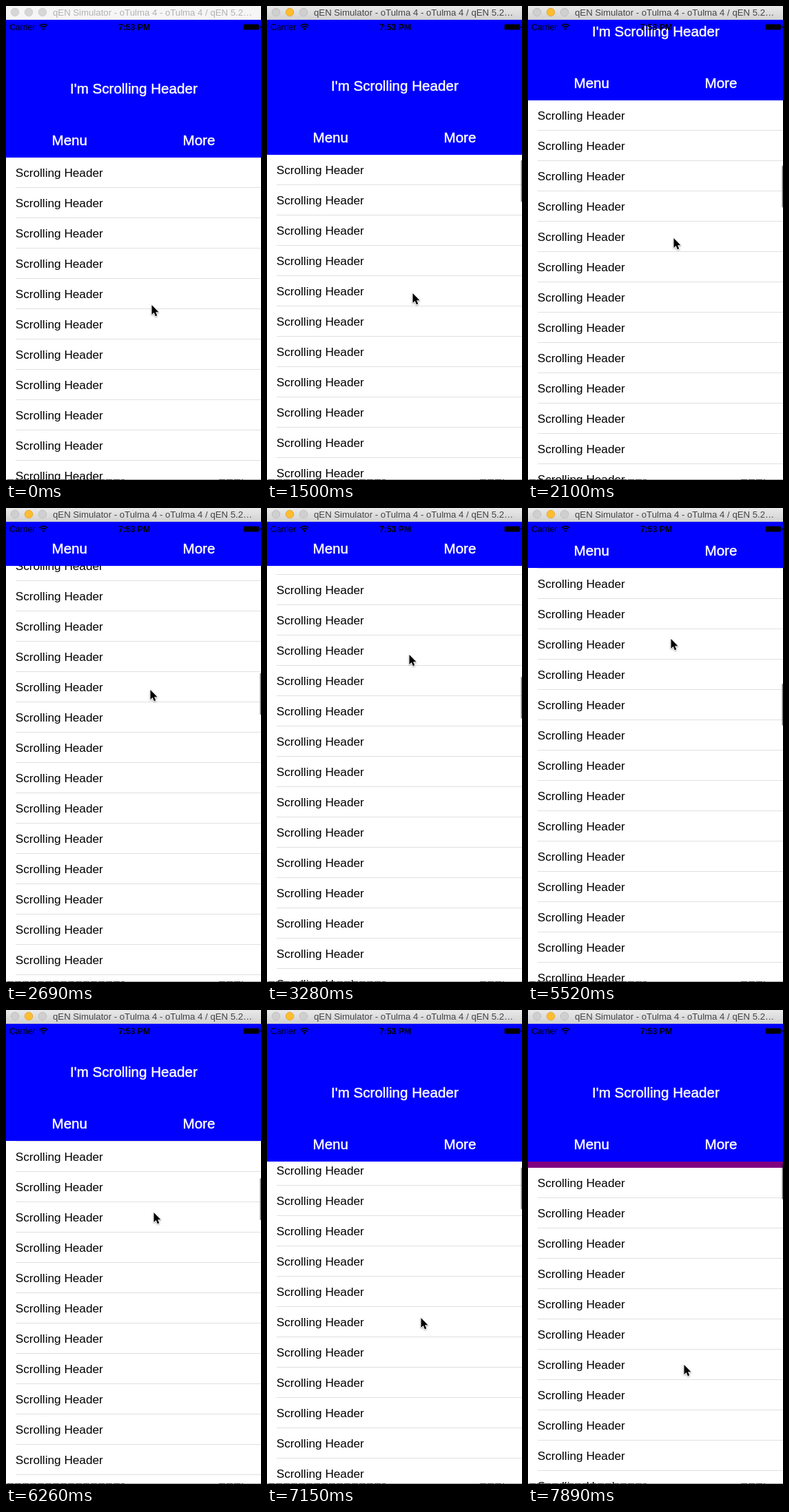
An HTML page that plays this animation: 370x688 px, repeating every 8 s.

```html
<!DOCTYPE html>
<html lang="en">
<head>
<meta charset="utf-8">
<title>Scrolling header</title>
<style>
  html, body { margin: 0; width: 100%; height: 100%; overflow: hidden; background: #fff; }
  svg { display: block; width: 370px; height: 688px; font-family: "Liberation Sans", Arial, sans-serif; }
  .row { font-size: 17.2px; }
  .head { font-size: 20.6px; fill: #fff; stroke: #fff; stroke-width: .45px; }
  .status { font-size: 12.2px; }
  .title { font-size: 13.2px; }
</style>
</head>
<body>
<svg viewBox="0 0 370 688">
  <defs>
    <linearGradient id="chrome" x2="0" y2="1">
      <stop stop-color="#e9e9e9"/><stop offset="1" stop-color="#d2d2d2"/>
    </linearGradient>
  </defs>

  <rect width="370" height="688" fill="#800080"/>
  <g id="list"><rect y="220" width="370" height="1000" fill="#fff"/></g>
  <rect id="thumb" x="368.5" width="3" rx="1.5" fill="#000"/>

  <g id="header">
    <rect y="-20" width="370" height="240" fill="#00f"/>
    <g class="head">
      <text x="93" y="126.5">I'm Scrolling Header</text>
      <text x="66.5" y="201.5">Menu</text>
      <text x="256.5" y="201.5">More</text>
    </g>
  </g>

  <g class="status">
    <text x="5" y="35">Carrier</text>
    <text x="163" y="35" font-weight="bold">7:53 PM</text>
    <g fill="none" stroke="#000" stroke-width="1.7">
      <path d="M48.6 28.8a8 8 0 0 1 11.4 0M50.6 31.2a5.2 5.2 0 0 1 7.4 0"/>
      <path d="M54.3 35.2l-2-2.2a3 3 0 0 1 4 0z" fill="#000" stroke="none"/>
    </g>
    <rect x="344.5" y="26.5" width="22.5" height="8" rx="1.5"/>
    <path d="M368 29v3q1.5-.3 1.5-1.5t-1.5-1.5z"/>
  </g>

  <rect id="bar" width="370" height="20"/>
  <g id="lights" stroke-width=".8">
    <circle cx="13" cy="9" r="5.8"/>
    <circle cx="33" cy="9" r="5.8"/>
    <circle cx="53" cy="9" r="5.8"/>
  </g>
  <text id="title" class="title" x="68" y="14">qEN Simulator - oTulma 4 - oTulma 4 / qEN 5.2…</text>

  <path d="M0 687.5H370" stroke="#a5a5a5"/>
  <path d="M2 687.5H172M309 687.5H344" stroke="#444" stroke-dasharray="9 2"/>

  <path id="cursor" d="M0 0V14L3.2 11.1 5.4 16.2 7.8 15.2 5.6 10.2H10Z"
        stroke="#fff" stroke-width="1.6" paint-order="stroke" stroke-linejoin="round"
        style="filter:drop-shadow(0 1px 1px rgba(0,0,0,.35))"/>
</svg>
<script>
const LOOP = 8000, START = 1349, STEP = 148.6;
const ROW = 44, ROWS = 20, OPEN = 220, CLOSED = 84, FARTHEST = 311;

// Keys are [step, value] pairs.
const scrollKeys = [[0, 0], [1, 4], [5, 83], [7, 120], [9, 158], [10, 176], [11, 191], [12, 203],
  [13, 211], [14, 215], [20, 215], [21, 224], [22, 240], [25, 299], [26, 311], [27, 311], [28, 308],
  [30, 270], [35, 162], [39, 53], [41, 20], [43, -2], [44, -9]];
// Cursor height plus scroll: constant while the finger holds the list.
const gripKeys = [[0, 434], [1, 421], [5, 420], [9, 422], [14, 425], [15, 425], [16, 450], [17, 487],
  [18, 508], [19, 508], [20, 504], [21, 501], [26, 498], [39, 500], [41, 500], [44, 506]];
const cursorXKeys = [[0, 211], [5, 211], [9, 209], [14, 205], [16, 206], [18, 210], [20, 210],
  [26, 207], [28, 207], [39, 223], [44, 226]];
const thumbKeys = [[0, 0], [1, .5], [15, .5], [18, 0], [20, 0], [21, .5]];

const $ = id => document.getElementById(id);
const set = (el, attrs) => {
  for (const name in attrs) el.setAttribute(name, attrs[name]);
};

function sample(keys, k) {
  const i = keys.findIndex(key => key[0] >= k);
  if (i === 0) return keys[0][1];
  if (i < 0) return keys[keys.length - 1][1];
  const [k0, v0] = keys[i - 1], [k1, v1] = keys[i];
  return v0 + (v1 - v0) * (k - k0) / (k1 - k0);
}

function addRow(i) {
  const y = OPEN + i * ROW;
  $('list').insertAdjacentHTML('beforeend',
    `<text class="row" x="13.7" y="${y + 28}">Scrolling Header</text>
     <rect x="14" y="${y + 43}" width="356" height="1" fill="#e0e0e2"/>`);
}
for (let i = 0; i < ROWS; i++) addRow(i);

function paintWindow(active) {
  set($('bar'), { fill: active ? 'url(#chrome)' : '#f6f6f6' });
  set($('title'), { fill: active ? '#444' : '#b2b2b2' });
  [...$('lights').children].forEach((light, i) => {
    const lit = active && i === 1;
    set(light, {
      fill: lit ? '#fdbd2e' : active ? '#cfcfcf' : '#d6d6d6',
      stroke: lit ? '#e0a030' : active ? '#b9b9b9' : '#cacaca'
    });
  });
}

function draw(time) {
  const k = Math.floor((time - START) / STEP);
  const scroll = Math.round(sample(scrollKeys, k));
  // The header folds with the scroll and unfolds as soon as the drag turns back.
  const bottom = k < 27
    ? Math.max(CLOSED, OPEN - scroll)
    : Math.min(OPEN, CLOSED + FARTHEST - scroll);

  paintWindow(k >= 0);
  set($('list'), { transform: `translate(0 ${-scroll})` });
  set($('header'), { transform: `translate(0 ${bottom - OPEN})` });
  set($('thumb'), {
    y: 223 + .103 * Math.max(0, scroll),
    height: 61 + Math.min(0, scroll),
    opacity: sample(thumbKeys, k)
  });
  const x = Math.round(sample(cursorXKeys, k));
  const y = Math.round(sample(gripKeys, k)) - scroll;
  set($('cursor'), { transform: `translate(${x + .5} ${y})` });
}

const begin = performance.now();
function tick() {
  draw((performance.now() - begin) % LOOP);
  requestAnimationFrame(tick);
}
tick();
</script>
</body>
</html>
```
